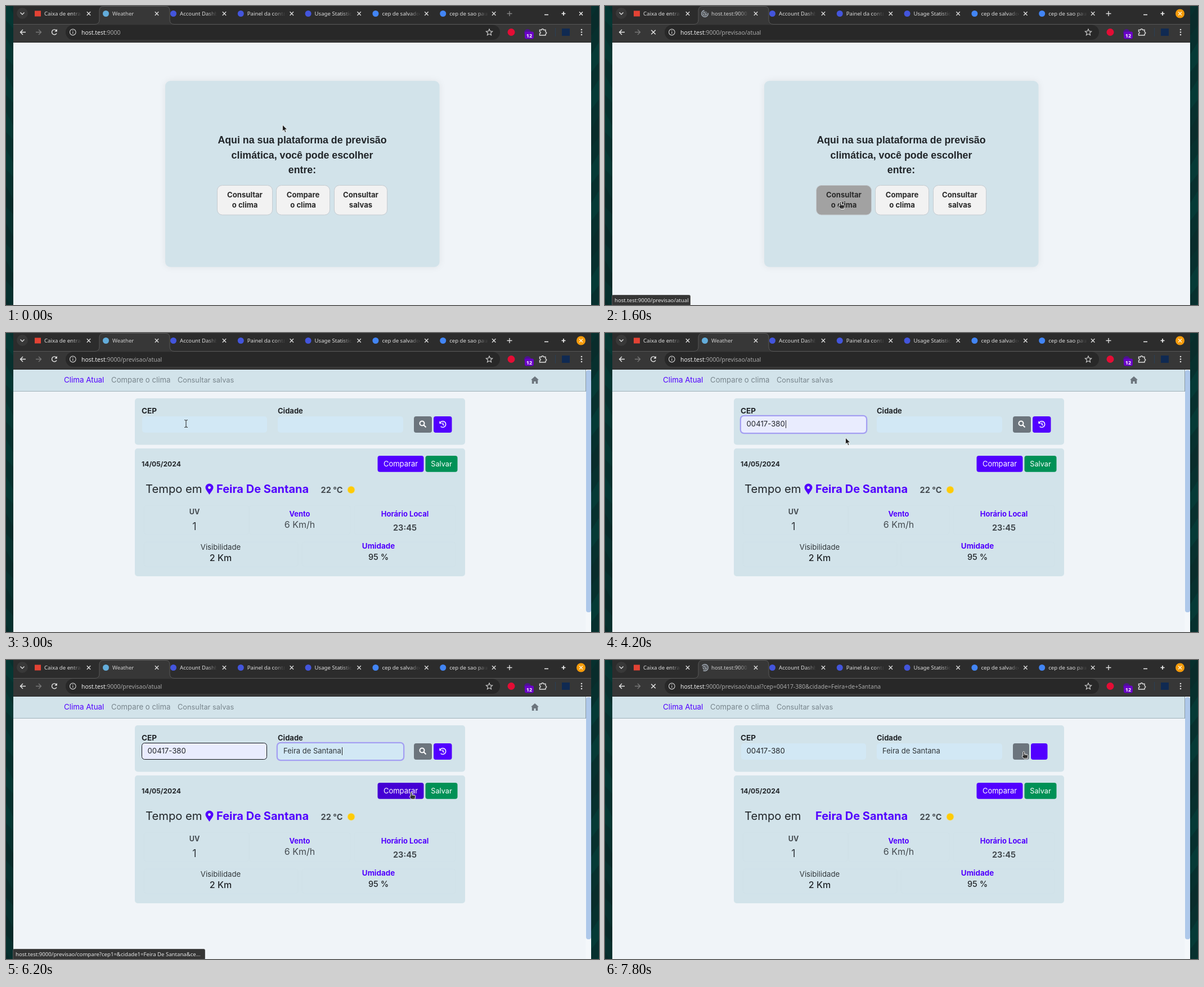
Recreate the animation shown at these times as an HTML page. Size 1054x531 px, loop 8000 ms.

```html
<!DOCTYPE html>
<html lang="pt-BR">
<head>
<meta charset="utf-8">
<title>Clima</title>
<style>
html, body { margin: 0; width: 100%; height: 100%; overflow: hidden; background: #07302e; }
svg { display: block; width: 1054px; height: 531px; }
text { white-space: pre; }
.ui { font-family: "Noto Sans", sans-serif; }
.page { font-family: Inter, sans-serif; }
.arial { font-family: "Liberation Sans", Arial, sans-serif; }
.icon { fill: none; stroke-width: 1.4; }
</style>
</head>
<body>
<svg viewBox="0 0 1054 531">
  <defs>
    <linearGradient id="fade"><stop stop-color="#2c2c2c" stop-opacity="0"/><stop offset="1" stop-color="#2c2c2c"/></linearGradient>
    <linearGradient id="fadeActive"><stop stop-color="#373737" stop-opacity="0"/><stop offset="1" stop-color="#373737"/></linearGradient>
  </defs>
  <g id="stage"></g>
</svg>
<script>
const LOOP = 8000;
const HOST = 'host.test', PORT = ':9000', ZIP = '00417-380', CITY = 'Feira de Santana';
const INDIGO = '#5200ff', CARD = '#d2e3ea', INK = '#212529', GRAY = '#6c757d', SLATE = '#444b50';

const rect = (x, y, x2, y2, fill, r = 0, extra = '') =>
  `<rect x="${x}" y="${y}" width="${x2 - x}" height="${y2 - y}" rx="${r}" fill="${fill}" ${extra}/>`;
const dot = (x, y, r, fill) => `<circle cx="${x}" cy="${y}" r="${r}" fill="${fill}"/>`;
const line = (d, color, width = 1.4) => `<path class="icon" d="${d}" stroke="${color}" style="stroke-width:${width}"/>`;
const shape = (d, fill, extra = '') => `<path d="${d}" fill="${fill}" ${extra}/>`;
const text = (cls, x, y, size, fill, str, weight = 400, anchor = 'start') =>
  `<text class="${cls}" x="${x}" y="${y}" font-size="${size}" fill="${fill}" font-weight="${weight}" text-anchor="${anchor}">${str}</text>`;
const label = (...a) => text('page', ...a);
const centered = (x, y, size, fill, str, weight = 400) => label(x, y, size, fill, str, weight, 'middle');
const cross = (x, y, r, color) => line(`M${x - r} ${y - r}l${2 * r} ${2 * r}m0 ${-2 * r}l${-2 * r} ${2 * r}`, color);
const at = (x, y, s) => `<g transform="translate(${x} ${y})">${s}</g>`;
const within = (t, a, b) => t >= a && t < b;
const ramp = (t, a, b) => Math.min(1, Math.max(0, (t - a) / (b - a)));
const mix = (a, b, k) => a + (b - a) * k;

// Pointer glides: start, end, x, y, look on arrival
const MOVES = [
  [0, 600, 415, 347, 'hand'], [1800, 2000, 388, 302, 'arrow'], [2000, 2300, 347, 232, 'arrow'],
  [2300, 2400, 330, 190, 'arrow'], [2900, 3000, 320, 161, 'beam'], [3500, 3600, 360, 200, 'arrow'],
  [3600, 3700, 357, 183, 'arrow'], [3900, 4000, 362, 190, 'arrow'], [4100, 4200, 427, 186, 'arrow'],
  [4200, 4300, 424, 172, 'arrow'], [4400, 4600, 583, 175, 'beam'], [4700, 4800, 591, 178, 'beam'],
  [4900, 5200, 714, 167, 'arrow'], [5300, 5500, 786, 163, 'hand'], [5600, 5800, 733, 213, 'arrow'],
  [5900, 6200, 717, 234, 'hand'], [6600, 6700, 736, 171, 'arrow'], [6800, 6900, 741, 162, 'hand']
];
const LOOKS = {
  arrow: shape('M.5 0V11.5L3.2 9 5 13.5l2-.8L5.2 8.4H8.8Z', '#1d1d1d', 'stroke="#fff" stroke-width=".8"'),
  hand: shape('M3 .5c1.3 0 1.6.8 1.6 1.8V5l4.8 1c1 .3 1.5 1 1.3 2.2L9.9 13.5H4L.6 9.5C-.1 8.4 1 7.5 2 8.3V2c0-1 .3-1.500 1-1.500Z', '#222', 'stroke="#fff"') +
    line('M4.600 5V8M6.600 5.500V8M8.600 6V8.200M5 10.500v2M6.800 10.500v2M8.500 10.500v2', '#ddd', 0.6),
  beam: line('M-3-6.500Q0-6.500 0-5Q0-6.500 3-6.500M0-5V5M-3 6.500Q0 6.500 0 5Q0 6.500 3 6.500', '#333', 1.1)
};

function pointer(t) {
  let x = 491, y = 211, look = 'arrow';
  for (const [start, end, toX, toY, next] of MOVES) {
    const k = ramp(t, start, end);
    x = mix(x, toX, k);
    y = mix(y, toY, k);
    if (k === 1) look = next;
  }
  return at(x.toFixed(1), y.toFixed(1), LOOKS[look]);
}

function desktop() {
  let s = rect(0, 0, 1054, 531, '#07302e');
  for (let i = 0; i < 9; i++) {
    const y = i * 66 - 10;
    s += shape(`M0 ${y}L13 ${y + 24}V${y + 50}L0 ${y + 36}Z`, i < 5 ? '#053733' : '#082a29');
    s += shape(`M1054 ${y + 8}L1040 ${y + 30}V${y + 62}L1054 ${y + 44}Z`, i % 3 ? '#053a36' : '#092c2b');
  }
  return s;
}

function tab(x, title, color, active, icon = dot(x - 11.5, 13.5, 5.5, color)) {
  return icon + `<svg x="${x}" y="0" width="66" height="30">` +
    text('ui', 0, 17, 9.6, active ? '#d0d0d0' : '#dedede', title) +
    rect(48, 2, 66, 28, `url(#fade${active ? 'Active' : ''})`) + '</svg>' +
    cross(x + 79, 13.5, 3.2, '#dadada');
}

function spinner(t) {
  const turn = (t / 100 * 50) % 360;
  return at(177.5, 13.5, dot(0, 0, 4, '#8b9096') + line('M-3-1Q0 0 0 3M0-4Q1-1 4 0', '#4c5055') +
    `<g transform="rotate(${turn})">${line('M0-5.8A5.8 5.8 0 1 1-5.8 0', '#a9b3bf')}</g>`);
}

function chrome(t) {
  const focused = t >= 800;
  const loading = within(t, 800, 3000) || t >= 7100;
  const path = t < 800 ? '' : '/previsao/atual' + (t >= 7100 ? `?cep=${ZIP}&amp;cidade=Feira+de+Santana` : '');
  const light = '#dedede', bright = '#e8e8e8', soft = '#c9c9c9';
  let s = rect(13, 0, 1040, 33, '#2c2c2c') + rect(13, 32, 1040, 65, '#373737') +
    shape('M158 33Q166 33 166 24V8Q166 0 174 0H283Q291 0 291 8V24Q291 33 299 33Z', '#373737') +
    line('M13 32.5H158Q166 32.5 166 24V8Q166 .5 174 .5H283Q291 .5 291 8V24Q291 32.5 299 32.5H1040', '#575757', 1) +
    dot(29, 13, 10, '#383838') + line('M25.5 11.5L29 15l3.5-3.5', light);

  s += tab(68, 'Caixa de entrada', '', false, rect(51, 8.5, 62, 18.5, '#e34234'));
  s += loading ? tab(189, HOST + PORT, '', true, spinner(t)) : tab(189, 'Weather', '#63addb', true);
  ['Account Dashboard', 'Painel da conta', 'Usage Statistics', 'cep de salvador', 'cep de sao paulo']
    .forEach((title, i) => s += tab(309 + i * 119.8, title, i < 3 ? '#4355dc' : '#4285f4', false));

  s += line('M890.5 13.5h9m-4.5-4.5v9', focused ? light : '#858585');
  s += line('M957 15.5h7M987.5 13.5h7m-3.5-3.5v7', '#f0f0f0', 1.7);
  s += focused ? dot(1022, 13.5, 8, '#f59b0b') + cross(1022, 13.5, 3, '#fff3dc') : cross(1022, 13.5, 3, '#f0f0f0');

  // Toolbar
  s += rect(106, 33.5, 878, 60, '#282828', 13.2) + rect(13, 64, 1040, 65, '#252525');
  s += line('M35 46.5H26M30 42l-4.5 4.5L30 51', bright) + line('M53 46.5h9M58 42l4.5 4.5L58 51', '#777');
  s += loading ? cross(86, 46.5, 3.8, bright)
    : line('M89.5 43.5A4.5 4.5 0 1 0 90 48.5', bright) + shape('M90.8 41v4.5h-4.5Z', bright);
  s += line('M113.5 46.5a5.3 5.3 0 1 0 10.6 0a5.3 5.3 0 1 0-10.6 0M118.8 45.8v3.5M118.8 43v1.4', soft, 1.2);
  s += text('ui', 134, 50.5, 10.45, '#a8a8a8', `<tspan fill="#ececec">${HOST}</tspan>${PORT}${path}`);
  s += line('M859 41l1.6 3.7 4 .4-3 2.7.9 3.9-3.5-2.1-3.5 2.1.9-3.9-3-2.7 4-.4Z', soft, 1.2);
  s += dot(898, 46.5, 6.5, '#e40d35') + dot(927, 47, 6, '#4b138f') + rect(922, 45.5, 938, 58.5, '#6a00c8', 3) +
    text('ui', 930, 55.5, 9, '#fff', '12', 700, 'middle');
  s += line('M948.5 42.5h3.5a1.8 1.8 0 0 1 3.6 0h3.4v3.5a1.8 1.8 0 0 1 0 3.6v2.4h-10.5v-3a1.7 1.7 0 0 0 0-3.4Z', light);
  s += rect(976, 39, 977, 54, '#294057') + rect(988, 40, 1002, 53, '#102a52');
  return s + [42, 46.5, 51].map(y => dot(1023, y, 1.3, light)).join('');
}

function homePage(t) {
  const title = ['Aqui na sua plataforma de previsão', 'climática, você pode escolher', 'entre:'];
  const level = Math.round(t < 1900 ? mix(242, 162, ramp(t, 400, 600)) : mix(162, 196, ramp(t, 1900, 2200)));
  const button = (x, x2, a, b, fill) => rect(x + .5, 318.5, x2 - .5, 371, fill, 9, 'stroke="#c5cbd0"') +
    centered((x + x2) / 2, 339.5, 13.1, '#292929', a, 700) + centered((x + x2) / 2, 358, 13.1, '#292929', b, 700);
  return rect(283, 133, 770.5, 463.5, CARD, 9, 'style="filter:drop-shadow(0 0 6px #0001)"') +
    title.map((row, i) => text('arial', 526.5, 244 + i * 26.67, 17.78, INK, row, 700, 'middle')).join('') +
    button(375, 474, 'Consultar', 'o clima', `rgb(${level},${level},${level})`) +
    button(480, 576, 'Compare', 'o clima', '#f2f2f2') + button(583, 678, 'Consultar', 'salvas', '#f2f2f2');
}

function field(x, x2, fill, ring, border, value, caret) {
  let s = '';
  if (ring) s += rect(x - .5, 147.5, x2 + .5, 177.5, 'none', 5.5, `stroke="#a49ff2" stroke-width="3.6" opacity="${ring}"`);
  s += border ? rect(x - .5, 147.5, x2 - .5, 176.5, fill, 5, `stroke="${border}"`) : rect(x, 148, x2, 177, fill, 5);
  return s + value + (caret ? rect(caret, 155, caret + 1, 169, '#222') : '');
}

function form(t, icons) {
  const reloaded = t >= 7700;
  const filled = t >= 3600 && !reloaded;
  const zipRing = t < 5000 ? ramp(t, 3200, 3400) : 1 - ramp(t, 4900, 5100);
  const cityRing = t < 7100 ? ramp(t, 4900, 5100) : 0;
  let zip = '';
  if (t >= 4200) zip = label(251.5, 166, 13.2, INK, ZIP);
  else if (t >= 3600) zip = text('ui', 252, 166, 11, INK, ZIP);
  const city = t >= 5400 ? label(493, 166, 13, '#30363a', CITY) : '';
  const shift = icons ? 3 : 0;
  let s = rect(229, 116, 816, 198.5, CARD, 5) +
    label(241, 142.5, 13.6, INK, 'CEP', 700) + label(483, 142.5, 13, INK, 'Cidade', 700) +
    field(242, 464, filled ? '#e9ecfe' : '#d2e8f5', zipRing, filled && t >= 5000 ? '#101416' : '', zip, within(t, 4200, 4800) && 321) +
    field(483, 706, '#d2e8f5', cityRing, '', city, within(t, 5400, 7100) && 597) +
    rect(725, 148, 754 + shift, 177, within(t, 6900, 7700) ? '#5c636a' : GRAY, 4) +
    rect(757 + shift, 148, 786.5 + shift * 2, 177, within(t, 5500, 6000) ? '#4600d9' : INDIGO, 4);
  if (icons) {
    s += line('M735.5 160.5a4 4 0 1 0 8 0a4 4 0 1 0-8 0M742.5 163.5l4 4', '#fff', 2) +
      line('M771.7 159.2A5.4 5.4 0 1 1 772.6 166M776.5 159v3.3l2 1.6', '#fff', 1.5) + shape('M770.3 156.300v4.700h4.700Z', '#fff');
  }
  return s;
}

function weather(t, icons) {
  const cell = (x, y, x2, y2) => rect(x, y, x2, y2, 'none', 5, 'stroke="#cee0e8" stroke-width=".8"');
  const button = (x, x2, fill, str, size) => rect(x, 218, x2, 246.7, fill, 4) + centered((x + x2) / 2, 237, size, '#fff', str);
  const pin = 'M361.5 287C359 283 354.5 278 354.5 274.5a7 7 0 0 1 14 0C368.5 278 364 283 361.5 287ZM361.5 272a2.5 2.5 0 1 0 .01 0Z';
  return rect(229, 205, 816, 432, CARD, 5) +
    label(241, 236.5, 12.1, INK, '14/05/2024', 700) +
    button(660.5, 742.5, within(t, 6100, 6700) ? '#4500d4' : INDIGO, 'Comparar', 13) +
    button(745.5, 802.5, '#009156', 'Salvar', 12.7) +
    label(248, 284, 20.2, INK, 'Tempo em') +
    (icons ? shape(pin, INDIGO, 'fill-rule="evenodd"') : '') +
    label(374, 284, 20, INDIGO, 'Feira De Santana', 700) +
    label(559.5, 284, 14.6, SLATE, '22 °C', 700) +
    dot(613.5, 278.5, 7, '#e4dfa5') + dot(613.5, 278.5, 6, '#ffcb05') +
    cell(245, 306, 432, 358) + cell(432, 306, 612, 358) + cell(619, 306, 799, 358) +
    cell(245, 371, 519, 415) + cell(526, 371, 799, 415) +
    centered(335, 322, 12.6, SLATE, 'UV', 700) + centered(335, 349.5, 18, '#33393d', '1') +
    centered(522, 325.5, 12.9, INDIGO, 'Vento', 700) + centered(522, 346, 16, SLATE, '6 Km/h') +
    centered(709, 325.5, 13, INDIGO, 'Horário Local', 700) + centered(709, 350.5, 14.5, SLATE, '23:45', 700) +
    centered(381.5, 385, 13.2, '#30363a', 'Visibilidade') + centered(381.5, 405, 16, INK, '2 Km', 500) +
    centered(662, 382.5, 13.4, INDIGO, 'Umidade', 700) + centered(662, 403, 14.5, INK, '95 %', 500);
}

function weatherPage(t) {
  const icons = within(t, 3000, 7700);
  return rect(13, 65, 1031, 103, CARD) + rect(13, 103, 1031, 104, '#9fb2ba') +
    label(103, 88, 13.4, INDIGO, 'Clima Atual') + label(187, 88, 13.2, '#78858c', 'Compare o clima') +
    label(305, 88, 12.8, '#78858c', 'Consultar salvas') +
    (icons ? shape('M940 77l7 6.3h-1.8V90h-3.7v-4h-3v4h-3.7v-6.7H933Z', GRAY) : '') +
    rect(1030.5, 65, 1040, 531, '#f4f7fa') + rect(1030, 65, 1031, 104, '#8d9ca5') +
    rect(1031, 66, 1040, 496, '#aec8ea', 4) + form(t, icons) + weather(t, icons);
}

function statusBar(t) {
  const tip = (right, path) => rect(12.5, 513.5, right, 532, '#353535', 2, 'stroke="#555"') +
    text('ui', 17, 526, 9.6, '#e6e6e6', HOST + PORT + path);
  if (within(t, 900, 3000)) return tip(151.5, '/previsao/atual');
  if (within(t, 6100, 6900)) return tip(353.5, '/previsao/compare?cep1=&amp;cidade1=Feira De Santana&amp;ce...');
  return '';
}

const stage = document.getElementById('stage');
const backdrop = desktop();
let shown = -1;

function draw() {
  const t = Math.floor(performance.now() % LOOP / 100) * 100;
  if (t !== shown) {
    shown = t;
    stage.innerHTML = backdrop + rect(13, 65, 1040, 531, '#f0f4f8') +
      (t < 2400 ? homePage(t) : weatherPage(t)) + chrome(t) + statusBar(t) + pointer(t);
  }
  requestAnimationFrame(draw);
}
draw();
</script>
</body>
</html>
```
